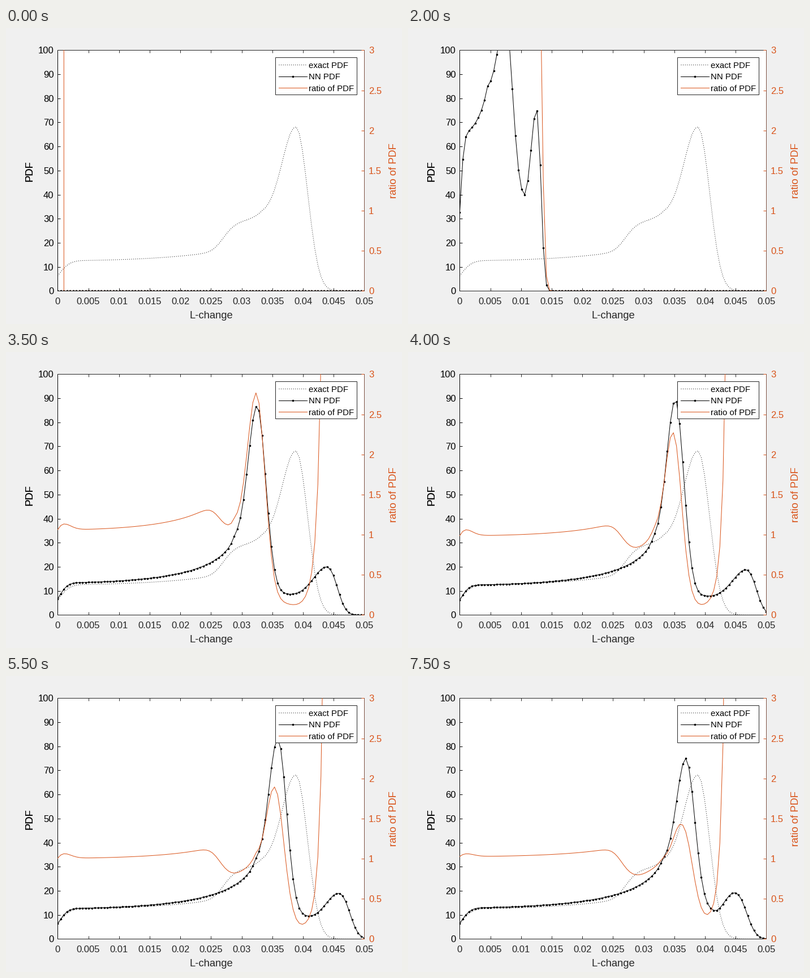
A matplotlib script that plays this animation: 700 by 525 pixels, repeating every 8000 ms.

```python
import math
import numpy as np
import matplotlib.pyplot as plt
from matplotlib.animation import FuncAnimation
from matplotlib.patches import Rectangle

plt.rcParams["font.family"] = "Liberation Sans"

W, H = 700, 525
PX = 0.72                      # points per pixel at 100 dpi
INK, ORANGE = "#262626", "#D95319"
DOTS = (0, (1, 2.6))
x = np.linspace(0, 50, 100)    # thousandths

phi = np.vectorize(lambda z: 0.5 * (1 + math.erf(z / math.sqrt(2))))


def arcsine(t, scale, radius):
    return scale * (1 - (t / radius) ** 2) ** -0.545


def climb(body, peak, top, width):
    """Follow body(t), then rise from it along a bell to the peak."""
    base = body(np.minimum(x, peak - 1.8 * width))
    return base + (top - base) * np.exp(-((x - peak) / width) ** 2)


def fall(peak, top, width, power):
    return top * np.exp(-(np.maximum(x - peak, 0) / width) ** power)


def exact_pdf():
    body = lambda t: arcsine(t, 12.6, 42) + 10.3 * phi((t - 27) / 1.4)
    left = climb(body, 38.8, 68.2, 3.05) * phi(x / 1.5)
    return np.where(x < 38.8, left, fall(38.8, 68.2, 2.7, 2.09))


def growing(n):
    """Peaks while the front still spreads to the right."""
    peak = 1.41 * n + 26 / (1 + math.exp(-1.5 * (n - 5.73)))
    scale = 500 / peak - 2
    end = peak * (1.773 - 0.0131 * peak)
    dip = peak + (end - peak) * (0.57 - 0.004 * peak)
    blur = (peak / 32.5) ** 0.57
    width = min(2 * blur ** 0.25, 0.3 * peak)
    return (scale, peak, 80 + 0.52 * scale, width, dip, 0.55 * scale + 1.2,
            end, 1.075 * scale + 5.6, blur)


def settling(n):
    """Peaks drifting slowly towards the exact curve."""
    s = (n - 9) / 6
    r = max(s, 0) ** 0.7
    peak = 35.4 + 1.46 * s
    return (12.45 + 0.5 * r, peak, 87.3 - 12.3 * s, 1.97 + 0.1 * s, peak + 4.7,
            8.3 + 3.1 * s, 46.6 - 1.85 * r, 18.8 + 0.4 * r, 1 + 0.12 * s)


def nn_pdf(n):
    scale, peak, top, width, dip, low, end, top2, blur = (
        growing(n) if n < 8 else settling(n))
    left = climb(lambda t: arcsine(t, scale, peak), peak, top, width)
    power = 1.05 + 0.14 * ((end - dip) / blur - 3.2)
    r = np.clip((x - dip) / (end - dip), 0, 1) ** power
    mid = (low + (top - low) * np.exp(-((x - peak) / width) ** 2)
           + (top2 - low) * r * r * (3 - 2 * r))
    right = fall(end, top2, 2.31 * blur, 2.38)
    return np.where(x < peak, left * phi(x / (1.2 * blur)),
                    np.where(x < end, mid, right))


def pixel_axes(x0, y0, x1, y1):
    return fig.add_axes([x0 / W, 1 - y1 / H, (x1 - x0) / W, (y1 - y0) / H])


fig = plt.figure(figsize=(7, 5.25), dpi=100, facecolor="#f0f0f0")
ax = pixel_axes(91.4, 39.4, 633.4, 466.4)
ax2 = ax.twinx()
ax.set(xlim=(0, 50), ylim=(0, 100), xticks=range(0, 51, 5), yticks=range(0, 101, 10))
ax2.set(ylim=(0, 3), yticks=np.arange(7) * 0.5)
ax.xaxis.set_major_formatter(lambda v, _: f"{v / 1000:g}")
ax2.yaxis.set_major_formatter(lambda v, _: f"{v:g}")

tick = dict(direction="in", length=5 * PX, width=PX, labelsize=12)
ax.tick_params(axis="x", top=True, pad=8.6, color=INK, labelcolor=INK, **tick)
ax.tick_params(axis="y", pad=5, color="k", **tick)
ax2.tick_params(axis="y", pad=5.4, color=ORANGE, labelcolor=ORANGE, **tick)
for side in ("top", "bottom", "left", "right"):
    ax.spines[side].set(linewidth=PX, color="k" if side == "left" else INK)
    ax2.spines[side].set_visible(side == "right")
ax.spines["right"].set_visible(False)
ax2.spines["right"].set(linewidth=PX, color="#7d5242")


def label(px, py, text, color, rot=0):
    fig.text(px / W, 1 - py / H, text, size=13.2, color=color, rotation=rot,
             rotation_mode="anchor", ha="center", va="baseline")


label(362.5, 515, "L-change", INK)
for _ in range(2):             # overprinted, so it looks heavier
    label(46.5, 253.5, "PDF", "k", 90)
label(689.5, 253.5, "ratio of PDF", ORANGE, 90)

exact = exact_pdf()
exact_style = dict(color="k", lw=PX, ls=DOTS)
nn_style = dict(color="k", lw=PX, marker="o", ms=3.6 * PX, mew=0)
ratio_style = dict(color=ORANGE, lw=PX)
ax.plot(x, exact, **exact_style)
nn_line, = ax.plot(x, 0 * x, **nn_style)
ratio_line, = ax2.plot(x, 0 * x, **ratio_style)

# Legend, laid out in pixels
box = pixel_axes(0, 0, W, H)
box.set(xlim=(0, W), ylim=(H, 0))
box.axis("off")
box.add_patch(Rectangle((476, 52), 144, 66, fc="w", ec=INK, lw=PX))
rows = [("exact PDF", exact_style), ("NN PDF", nn_style), ("ratio of PDF", ratio_style)]
for i, (name, style) in enumerate(rows):
    y = 65.4 + 20.5 * i
    box.plot([481.5, 506.5, 531.5], [y] * 3, markevery=[1], **style)
    box.text(535, y + 5.5, name, size=10.8, color="k", va="baseline")


def update(n):
    if n == 0:
        nn, ratio = 0 * x, np.where(x < 1, 1000.0, 0)
    else:
        nn = nn_pdf(n)
        ratio = np.minimum(nn / exact, 1000)
    nn_line.set_ydata(nn)
    ratio_line.set_ydata(ratio)
    return nn_line, ratio_line


anim = FuncAnimation(fig, update, frames=16, interval=500, repeat=True, repeat_delay=0)
plt.show()
```
